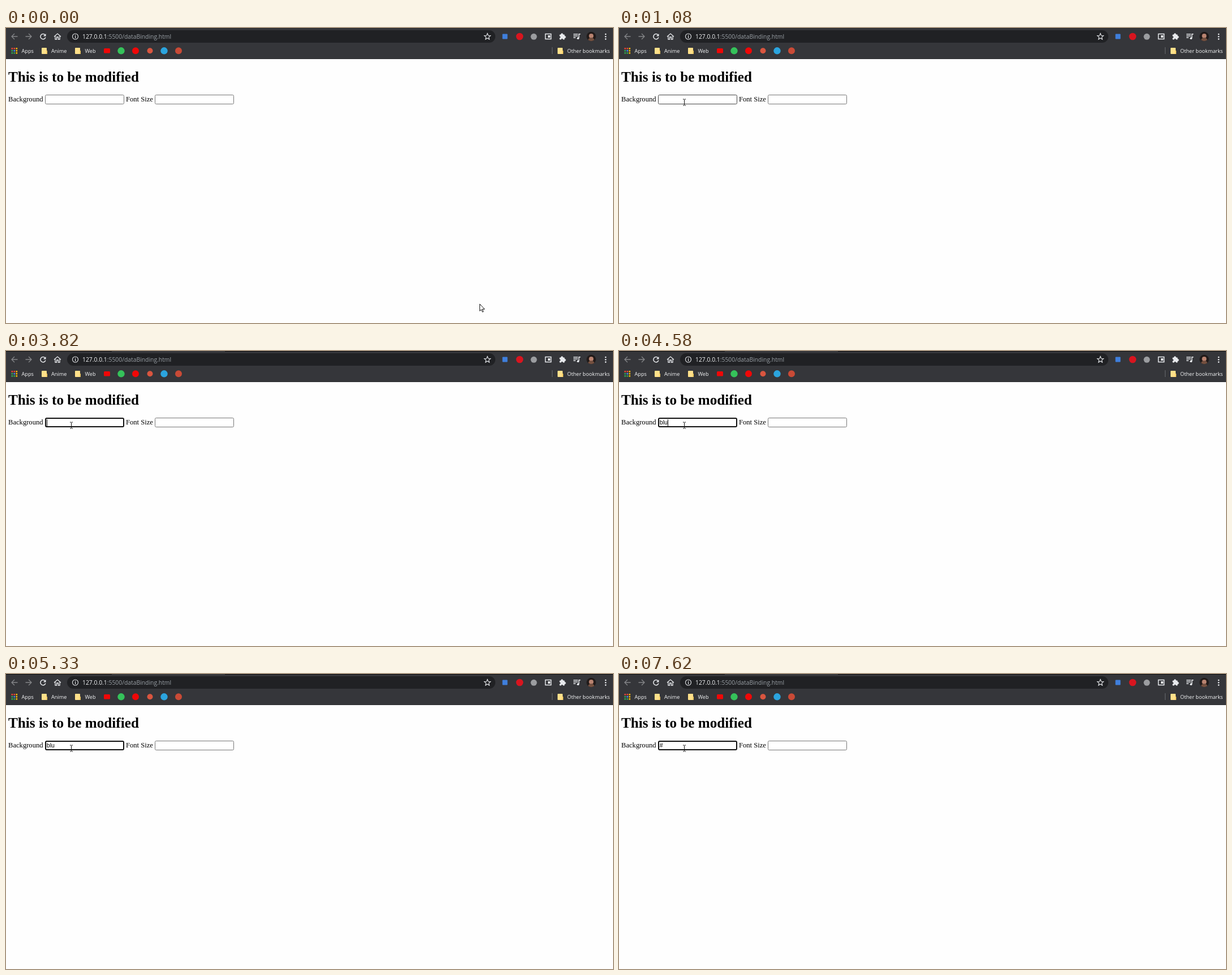
These frames come from a looping animation (1073x522 px, 8000 ms). An HTML page with a canvas:

```html
<!DOCTYPE html>
<html lang="en">
<head>
<meta charset="utf-8">
<title>Data binding demo</title>
<style>
html, body { margin: 0; width: 100%; height: 100%; overflow: hidden; background: #fefefe; }
canvas { display: block; }
</style>
</head>
<body>
<canvas id="stage" width="1073" height="522"></canvas>
<script>
const ctx = document.getElementById('stage').getContext('2d');
const LOOP = 8000;
const UI = '"Open Sans", "Noto Sans", sans-serif';
const SERIF = '"Liberation Serif", "Times New Roman", serif';
const INPUT_FONT = '10.5px "Liberation Sans", Arial, sans-serif';
const LIGHT = '#e8eaed', BAR = '#35363a', DARK = '#202124';

// [start ms, field text, caret visible]
const typing = [
  [2740, '', 1], [3260, '', 0], [3820, '', 1],
  [4150, 'b', 1], [4240, 'bl', 1], [4580, 'blu', 1], [4800, 'blue', 1],
  [5330, 'blu', 0], [5560, 'bl', 0], [5780, 'b', 0], [5890, '', 0],
  [6000, '', 1], [6430, '', 0], [6860, '', 1],
  [7190, '#', 1], [7620, '#', 0]
];

function text(str, x, y, font, color) {
  ctx.font = font;
  ctx.fillStyle = color;
  ctx.fillText(str, x, y);
}

function rect(x, y, w, h, color) {
  ctx.fillStyle = color;
  ctx.fillRect(x, y, w, h);
}

function round(x, y, w, h, r, color) {
  ctx.beginPath();
  ctx.roundRect(x, y, w, h, r);
  ctx.fillStyle = color;
  ctx.fill();
}

function disc(x, y, r, color) {
  ctx.beginPath();
  ctx.arc(x, y, r, 0, Math.PI * 2);
  ctx.fillStyle = color;
  ctx.fill();
}

function path(d, x, y, stroke, fill, width = 1.3) {
  const p = new Path2D(d);
  ctx.save();
  ctx.translate(x, y);
  if (fill) { ctx.fillStyle = fill; ctx.fill(p); }
  if (stroke) { ctx.strokeStyle = stroke; ctx.lineWidth = width; ctx.stroke(p); }
  ctx.restore();
}

function folder(x) {
  round(x, 35, 9, 11, 1, '#ffe08a');
  rect(x + 8, 40, 2, 6, '#f3cb62');
}

function star(x, y, r) {
  ctx.beginPath();
  for (let i = 0; i < 10; i++) {
    const a = i * Math.PI / 5 - Math.PI / 2, d = i % 2 ? r * 0.45 : r;
    ctx.lineTo(x + d * Math.cos(a), y + d * Math.sin(a));
  }
  ctx.closePath();
  ctx.strokeStyle = LIGHT;
  ctx.lineWidth = 1.1;
  ctx.stroke();
}

function navigation() {
  path('M5.5 0H-5M0-5L-5 0L0 5', 15, 15, '#858689');
  path('M-5.5 0H5M0-5L5 0L0 5', 40, 15, '#858689');
  path('M3.6-2.9A4.6 4.6 0 1 0 4.4 1.4', 65.5, 15.2, LIGHT, null, 1.5);
  path('M5-5.2V-.6H.4Z', 65.5, 15.2, null, LIGHT);
  path('M-6 .3L0-5L6 .3M-4-1V5H-1.4V1H1.4V5H4V-1', 91, 15, LIGHT);
}

function addressBar() {
  round(108, 4, 757, 22, 11, DARK);
  path('M-5 0A5 5 0 1 1 5 0A5 5 0 1 1-5 0', 122.5, 15, LIGHT, null, 1.1);
  rect(122, 14, 1.2, 4, LIGHT);
  rect(122, 12, 1.2, 1.2, LIGHT);
  const font = '10.35px ' + UI, host = '127.0.0.1';
  text(host, 135, 19, font, '#f1f3f4');
  text(':5500/dataBinding.html', 135 + ctx.measureText(host).width, 19, font, '#9aa0a6');
  star(851, 15.3, 5.8);
}

function extensions() {
  round(877.5, 10.5, 9, 9, 1, '#3f7fdc');
  disc(908, 15, 6.3, '#d8151f');
  disc(933, 15.3, 5.5, '#9b9da0');

  ctx.strokeStyle = LIGHT;
  ctx.lineWidth = 1.5;
  ctx.strokeRect(953.5, 10.5, 10, 9);
  rect(958, 13, 4, 4, LIGHT);

  round(978.5, 11.5, 9, 9, 1, LIGHT);
  disc(982.8, 11.2, 1.9, LIGHT);
  disc(987.8, 16, 1.9, LIGHT);
  disc(978.7, 16, 1.5, BAR);
  disc(983, 20.3, 1.5, BAR);

  path('M-6-4H2M-6-1H2M-6 2H-2M3.7 3V-4.3H6.5', 1009, 15, LIGHT, null, 1.4);
  disc(1011.2, 18.2, 1.9, LIGHT);

  ctx.save();
  ctx.beginPath();
  ctx.arc(1034.5, 15, 8.3, 0, Math.PI * 2);
  ctx.clip();
  rect(1026, 6, 17, 18, '#201a19');
  disc(1034.5, 14, 4, '#b98370');
  disc(1034.5, 23, 6, '#74503f');
  ctx.restore();

  for (const y of [11, 15.3, 19.6]) disc(1060, y, 1.3, LIGHT);
}

function bookmarks() {
  const dots = ['#ea4335', '#ea4335', '#fbbc05', '#34a853', '#4285f4', '#fbbc05', '#34a853', '#34a853', '#fbbc05'];
  dots.forEach((c, i) => rect(9.5 + i % 3 * 4, 35 + Math.floor(i / 3) * 4, 2.6, 2.6, c));
  const label = (str, x) => text(str, x, 43.5, '9.2px ' + UI, '#f4f5f6');
  label('Apps', 27.5);
  folder(63);
  label('Anime', 80);
  folder(122);
  label('Web', 139.5);
  round(173, 36, 11, 8.5, 1.5, '#f00707');
  disc(203.5, 40.3, 6.2, '#35c25a');
  disc(229, 40.3, 6, '#f00707');
  disc(254.5, 40.3, 5, '#d9553f');
  disc(279.5, 40.3, 6.2, '#2ba4de');
  disc(305, 40.3, 6, '#c94a36');
  rect(965, 34, 1, 12, '#66686c');
  folder(975);
  label('Other bookmarks', 992);
}

function chrome(active) {
  rect(0, 0, 1073, 55, BAR);
  rect(0, 0, 1073, 1, active ? '#0b0b0c' : '#2a2b2e');
  if (active) rect(187, 0, 200, 1, BAR);
  navigation();
  addressBar();
  extensions();
  bookmarks();
  rect(0, 54, 1073, 1, '#2d2e31');
}

function field(x, state) {
  const focus = state === 'focus', w = focus ? 2 : 1;
  ctx.beginPath();
  ctx.roundRect(x + w / 2, 118 + w / 2, 140 - w, 17 - w, 2);
  ctx.fillStyle = '#fff';
  ctx.fill();
  ctx.strokeStyle = { idle: '#767676', hover: '#444', focus: '#101010' }[state];
  ctx.lineWidth = w;
  ctx.stroke();
}

function page(t, value, caret) {
  rect(0, 55, 1073, 467, '#fefefe');
  if (value === 'blue') rect(4, 72, 1067, 29, '#00f');
  text('This is to be modified', 4, 95, 'bold 25.2px ' + SERIF, '#000');
  text('Background', 4, 130, '12.6px ' + SERIF, '#000');
  text('Font Size', 212, 130, '12.6px ' + SERIF, '#000');
  field(69, t >= 2740 ? 'focus' : t >= 980 ? 'hover' : 'idle');
  field(263, 'idle');
  text(value, 71.8, 130, INPUT_FONT, '#000');
  if (caret) rect(72 + Math.floor(ctx.measureText(value).width + 0.15), 121, 1, 12, '#000');
}

function pointer(t) {
  if (t >= 980) {
    const [x, y] = t < 1080 ? [118, 133] : [115, 131];
    path('M-2 -5.5H0M1 -5.5H3M-2 5.5H0M1 5.5H3M.5-5V5', x, y + 0.5, '#111', null, 1);
    return;
  }
  const step = t < 100 ? 0 : Math.min(8, 1 + Math.floor((t - 100) / (760 / 7)));
  const p = step / 8, ease = p * p * (3 - 2 * p);
  path('M0 0V12.3L2.8 9.7L4.7 14.1L6.5 13.3L4.6 9H8.6Z',
    Math.round(836.5 - 711 * ease) + 0.5, Math.round(487.5 - 351 * ease) + 0.5, '#111', '#fff', 1);
}

function draw(now) {
  const t = now % LOOP;
  let value = '', caret = 0;
  for (const [at, str, on] of typing) if (t >= at) [value, caret] = [str, on];
  chrome(t >= 2740);
  page(t, value, caret);
  pointer(t);
}

const start = performance.now();
function tick() {
  draw(performance.now() - start);
  requestAnimationFrame(tick);
}
tick();
</script>
</body>
</html>
```
